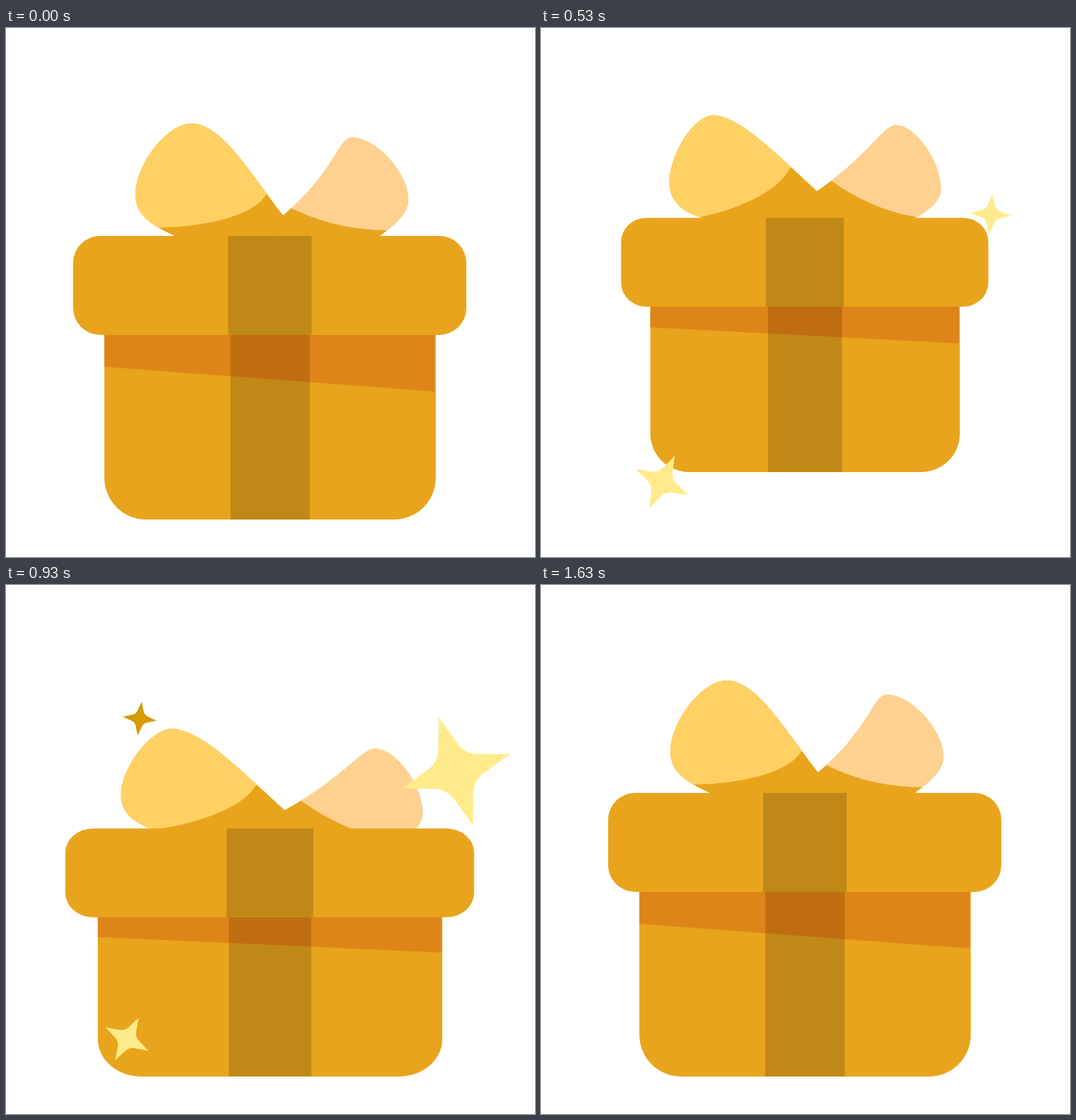
An HTML page with a canvas that plays this animation: 748x748 px, repeating every 1.66 s.

```html
<!DOCTYPE html>
<html lang="en">
<head>
<meta charset="utf-8">
<title>Jumping gift box</title>
<style>
  html, body { margin: 0; width: 100%; height: 100%; overflow: hidden; background: #fff; }
  canvas { display: block; width: 100vw; height: 100vh; }
</style>
</head>
<body>
<canvas id="stage" width="748" height="748"></canvas>
<script>
const ctx = document.getElementById('stage').getContext('2d');
const LOOP = 1660, FLOOR = 695, CENTER = 373.1;
const COLOR = {
  gold: '#e8a41c', ribbon: '#c08817', shade: '#dd8518', shadeRibbon: '#c06d12',
  loopLeft: '#ffd064', loopRight: '#ffd190', star: '#ffeb8c', darkStar: '#d49b05'
};

const mix = (a, b, u) => a + (b - a) * u;
const mixPoint = (p, q, u) => [mix(p[0], q[0], u), mix(p[1], q[1], u)];
const smooth = u => { u = Math.min(1, Math.max(0, u)); return u * u * (3 - 2 * u); };

// Monotone cubic easing through [tick, value] keys.
function track(...keys) {
  const slopes = keys.slice(1).map((key, i) => (key[1] - keys[i][1]) / (key[0] - keys[i][0]));
  const tangent = keys.map((_, i) => {
    const a = slopes[i - 1], b = slopes[i];
    return a * b > 0 ? 2 * a * b / (a + b) : 0;
  });
  return k => {
    if (k <= keys[0][0]) return keys[0][1];
    const i = keys.findIndex(key => key[0] > k) - 1;
    if (i < 0) return keys[keys.length - 1][1];
    const [k0, v0] = keys[i], [k1, v1] = keys[i + 1], h = k1 - k0, u = (k - k0) / h, w = 1 - u;
    return mix(v0, v1, smooth(u)) + h * u * w * (w * tangent[i] - u * tangent[i + 1]);
  };
}

// Crouch at 12.5, top of the jump at 19.5, touch down at 25, settled by 33.
const lift = track([12.5, 0], [16, 67], [19.5, 134], [23, 40], [25, 0]);
const stretch = track([12.5, 1], [16, .934], [19.5, .9], [23, .9155], [27, 1.044], [32, 1]);
const lidHeight = track([7.5, 140], [12.5, 116], [16, 125.5], [23, 137.5], [27.5, 125], [32, 140]);
const bodyShown = track([7.5, 261], [12.5, 209], [16, 234], [23, 242], [27.5, 224], [32, 261]);
const shadeDepth = track([7.5, 80], [12.5, 21], [16, 52], [23, 42.5], [28, 50], [32, 80]);
const perk = track([7.5, 0], [12.5, -1], [16, -1], [19.5, .3], [23, 1], [27, -1], [28, -1], [33, 0]);
const bowDrop = track([7.5, 0], [12.5, -9], [16, 0], [23, 0], [28, 11], [33, 0]);
const bowLean = track([23, 0], [28, .05], [33, 0]);

// Key points of a loop: inner edge, fold's inner end, tip, side, fold's outer end, base.
// `reach` and `pull` set how the inner edge runs to the tip, `belly` how the side turns under.
const LOOPS = [
  {
    side: 1, color: COLOR.loopRight, reach: 100, pull: 20, belly: 25, bend: [.35, .7], sag: 11,
    rest: [[15, -26], [31, -39], [116, -139], [196, -51], [167, -8], [137, 13]],
    droop: [[14, -35], [41, -52], [138, -131], [206, -41], [170, -1], [147, 10]],
    perky: [[12, -48], [17.5, -64], [59, -186], [159.5, -121], [146, -82], [30, 24]]
  },
  {
    side: -1, color: COLOR.loopLeft, reach: 80, pull: 44, belly: 40, bend: [.5, .9], sag: 22,
    rest: [[22, -25], [-5, -59], [-111, -159], [-190, -58], [-153, -12], [-111, 12]],
    droop: [[34, -25], [-22.5, -71], [-139, -145], [-205, -49], [-159.5, -1], [-142, 3]],
    perky: [[31, -42], [20, -79], [-58, -219], [-151, -116], [-131, -67], [-36, 16]]
  }
];

function drawLoop(loop, amount) {
  const pose = amount < 0 ? loop.droop : loop.perky;
  const [edge, inner, tip, side, outer, base] =
    loop.rest.map((p, i) => mixPoint(p, pose[i], Math.abs(amount)));
  const round = .43;
  const start = mixPoint(edge, inner, loop.reach / Math.hypot(inner[0] - edge[0], inner[1] - edge[1]));

  const outline = new Path2D();
  outline.moveTo(...edge);
  outline.bezierCurveTo(...start, tip[0] - loop.side * loop.pull, tip[1], ...tip);
  outline.bezierCurveTo(mix(tip[0], side[0], round), tip[1], side[0], mix(side[1], tip[1], round), ...side);
  outline.bezierCurveTo(side[0], side[1] + loop.belly, ...mixPoint(outer, base, .2), ...base);
  outline.lineTo(0, 30);
  outline.closePath();

  ctx.save();
  ctx.fillStyle = COLOR.gold;
  ctx.fill(outline);
  ctx.clip(outline);

  // Everything above the sagging fold is lighter.
  const [c1, c2] = loop.bend.map(u => mixPoint(outer, inner, u));
  const far = loop.side * 400;
  ctx.fillStyle = loop.color;
  ctx.beginPath();
  ctx.moveTo(far, outer[1]);
  ctx.lineTo(...outer);
  ctx.bezierCurveTo(c1[0], c1[1] + loop.sag, c2[0], c2[1] + loop.sag, ...inner);
  ctx.lineTo(-far, inner[1]);
  ctx.lineTo(-far, -400);
  ctx.lineTo(far, -400);
  ctx.fill();
  ctx.restore();
}

function drawBow(k, lidTop) {
  ctx.save();
  ctx.translate(CENTER, lidTop + bowDrop(k));
  ctx.rotate(bowLean(k));
  ctx.scale(stretch(k), 1);
  LOOPS.forEach(loop => drawLoop(loop, perk(k)));
  ctx.restore();
}

function fillRect(x0, y0, x1, y1, color) {
  ctx.fillStyle = color;
  ctx.fillRect(x0, y0, x1 - x0, y1 - y0);
}

// Rounded box whose corners are squashed together with it.
function fillRound(center, top, half, height, radius, sx, sy) {
  ctx.save();
  ctx.translate(center, top);
  ctx.scale(sx, sy);
  ctx.fillStyle = COLOR.gold;
  ctx.beginPath();
  ctx.roundRect(-half, 0, 2 * half, height, radius);
  ctx.fill();
  ctx.restore();
}

function drawGift(k) {
  const sx = stretch(k), bottom = FLOOR - lift(k), seam = bottom - bodyShown(k);
  const lidTop = seam - lidHeight(k), depth = shadeDepth(k);
  const bodyScale = mix(1, bodyShown(k) / 261, .75), bodyTop = bottom - 387 * bodyScale;
  const middle = CENTER + .3, half = 234.3 * sx, band = 56 * sx;
  const left = middle - half, right = middle + half - 1.3;

  drawBow(k, lidTop);
  fillRound(middle, bodyTop, 234.3, 387, 59, sx, bodyScale);
  fillRect(middle - band, bodyTop, middle + band, bottom, COLOR.ribbon);

  ctx.save();
  ctx.beginPath();
  ctx.moveTo(left, seam - 1);
  ctx.lineTo(right, seam - 1);
  ctx.lineTo(right, seam + depth);
  ctx.lineTo(left, seam + depth * .5625);
  ctx.fillStyle = COLOR.shade;
  ctx.fill();
  ctx.clip();
  fillRect(middle - band, seam - 1, middle + band, seam + depth, COLOR.shadeRibbon);
  ctx.restore();

  fillRound(CENTER - .2, lidTop, 278, 140, 38, sx, lidHeight(k) / 140);
  fillRect(CENTER - 59 * sx, lidTop, CENTER + 59 * sx, seam, COLOR.ribbon);
}

// Share of full size: a quick pop, a steady swell, then a fade to nothing.
function starSize(age) {
  if (age < 6) return .63 * smooth(age / 6);
  if (age < 16) {
    const u = (age - 6) / 10;
    return mix(.63, 1, u * (1.2 - .2 * u));
  }
  return 1 - smooth((age - 16) / 8.6);
}

// `turn` is the number of ticks a half turn takes.
function drawStar(age, turn, x, y, radius, color) {
  const r = radius * starSize(age);
  if (age <= 0 || r <= 0) return;
  ctx.save();
  ctx.translate(x, y);
  ctx.rotate(Math.PI * smooth(age / turn));
  ctx.scale(r, r);
  ctx.fillStyle = color;
  ctx.beginPath();
  for (let i = 0; i < 4; i++) {
    ctx.lineTo(0, -1);
    ctx.lineTo(.173, -.467);
    ctx.quadraticCurveTo(.245, -.245, .467, -.173);
    ctx.lineTo(1, 0);
    ctx.rotate(Math.PI / 2);
  }
  ctx.fill();
  ctx.restore();
}

function draw(now) {
  // Thirty ticks a second, each starting on a whole hundredth.
  const tick = Math.floor((Math.floor((now % LOOP) / 10) + .4) * .3);
  ctx.fillStyle = '#fff';
  ctx.fillRect(0, 0, 748, 748);
  drawStar(tick - 24.4, 31, 189, 189, 59.5, COLOR.darkStar);
  drawGift(tick);
  drawStar(tick - 8.2, 32.5, 171, 642, 59, COLOR.star);
  drawStar(tick - 12.8, 35, 636, 263.5, 82.5, COLOR.star);
}

const began = performance.now();
function loop() {
  draw(performance.now() - began);
  requestAnimationFrame(loop);
}
loop();
</script>
</body>
</html>
```
